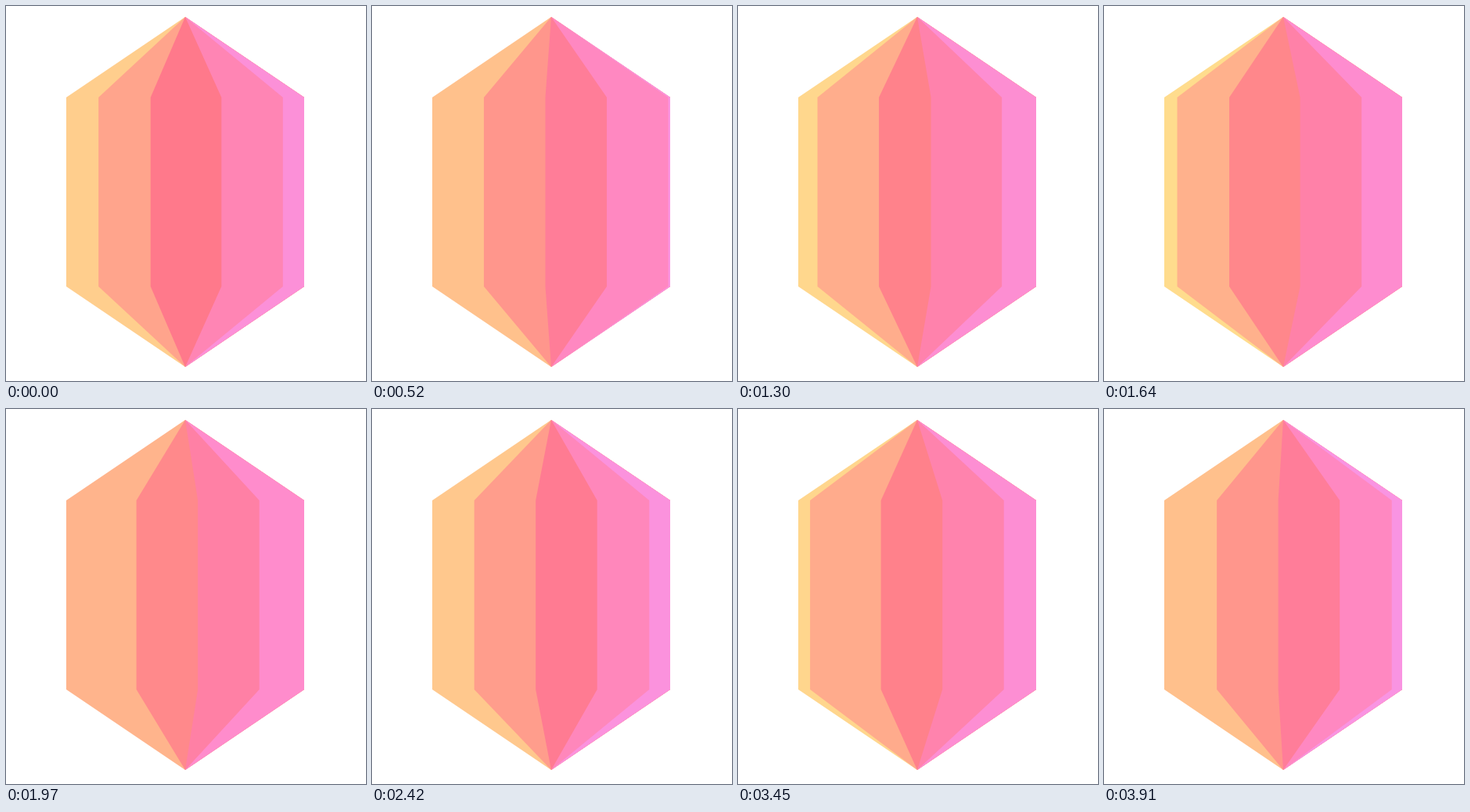
Animation of 460 by 480 pixels, one loop 3940 ms. Source, as an HTML page with a canvas:

```html
<!DOCTYPE html>
<html>
<head>
<meta charset="utf-8">
<title>Spinning gem</title>
<style>
  html, body { margin: 0; width: 100%; height: 100%; overflow: hidden; background: #fff; }
  canvas { display: block; }
</style>
</head>
<body>
<canvas id="gem" width="460" height="480"></canvas>
<script>
const ctx = document.getElementById('gem').getContext('2d');

const LOOP = 3940;
const LEFT = 77, RIGHT = 381, MID = 229;
const TOP = 14, SHOULDER = 117, HIP = 359, BOTTOM = 462;

const EDGES = 5;        // edges per full turn
const GAP = 78.54;      // spacing between edges
const SPEED = 0.2545;   // px per ms, leftwards
const START = 197;      // place of edge 0 at time 0
const LAG = 12;         // edge 0 runs slightly ahead of the rest

// Face colour by the place of its left edge: [x, r, g, b]
const STOPS = [
  [-20, 255, 238, 143],
  [20, 255, 217, 141],
  [197, 255, 121, 139],
  [255, 255, 130, 170],
  [320, 255, 139, 203],
  [385, 249, 149, 228]
];

function colorAt(x) {
  const last = STOPS.length - 1;
  x = Math.min(Math.max(x, STOPS[0][0]), STOPS[last][0]);
  let i = 1;
  while (i < last && x > STOPS[i][0]) i++;
  const a = STOPS[i - 1], b = STOPS[i];
  const k = (x - a[0]) / (b[0] - a[0]);
  const mix = c => Math.round(a[c] + (b[c] - a[c]) * k);
  return `rgb(${mix(1)},${mix(2)},${mix(3)})`;
}

// Fills the gem from x to its right side; later faces cover the rest.
function drawFace(x, color) {
  ctx.fillStyle = color;
  ctx.beginPath();
  ctx.moveTo(MID, TOP);
  ctx.lineTo(RIGHT, SHOULDER);
  ctx.lineTo(RIGHT, HIP);
  ctx.lineTo(MID, BOTTOM);
  ctx.lineTo(x, HIP);
  ctx.lineTo(x, SHOULDER);
  ctx.closePath();
  ctx.fill();
}

function draw(t) {
  ctx.fillStyle = '#fff';
  ctx.fillRect(0, 0, 460, 480);

  const origin = START - SPEED * t;
  const faces = [];
  for (let k = Math.floor((LEFT - origin) / GAP) - 1; ; k++) {
    const place = origin + k * GAP;
    const x = place - (k % EDGES === 0 ? LAG : 0);
    if (x >= RIGHT) break;
    faces.push({ x, place });
  }

  // Only the last edge past the left side is visible there.
  let first = 0;
  while (first + 1 < faces.length && faces[first + 1].x <= LEFT) first++;
  for (const { x, place } of faces.slice(first)) {
    drawFace(Math.max(x, LEFT), colorAt(place));
  }
}

const begin = performance.now();
function tick() {
  draw((performance.now() - begin) % LOOP);
  requestAnimationFrame(tick);
}
tick();
</script>
</body>
</html>
```
